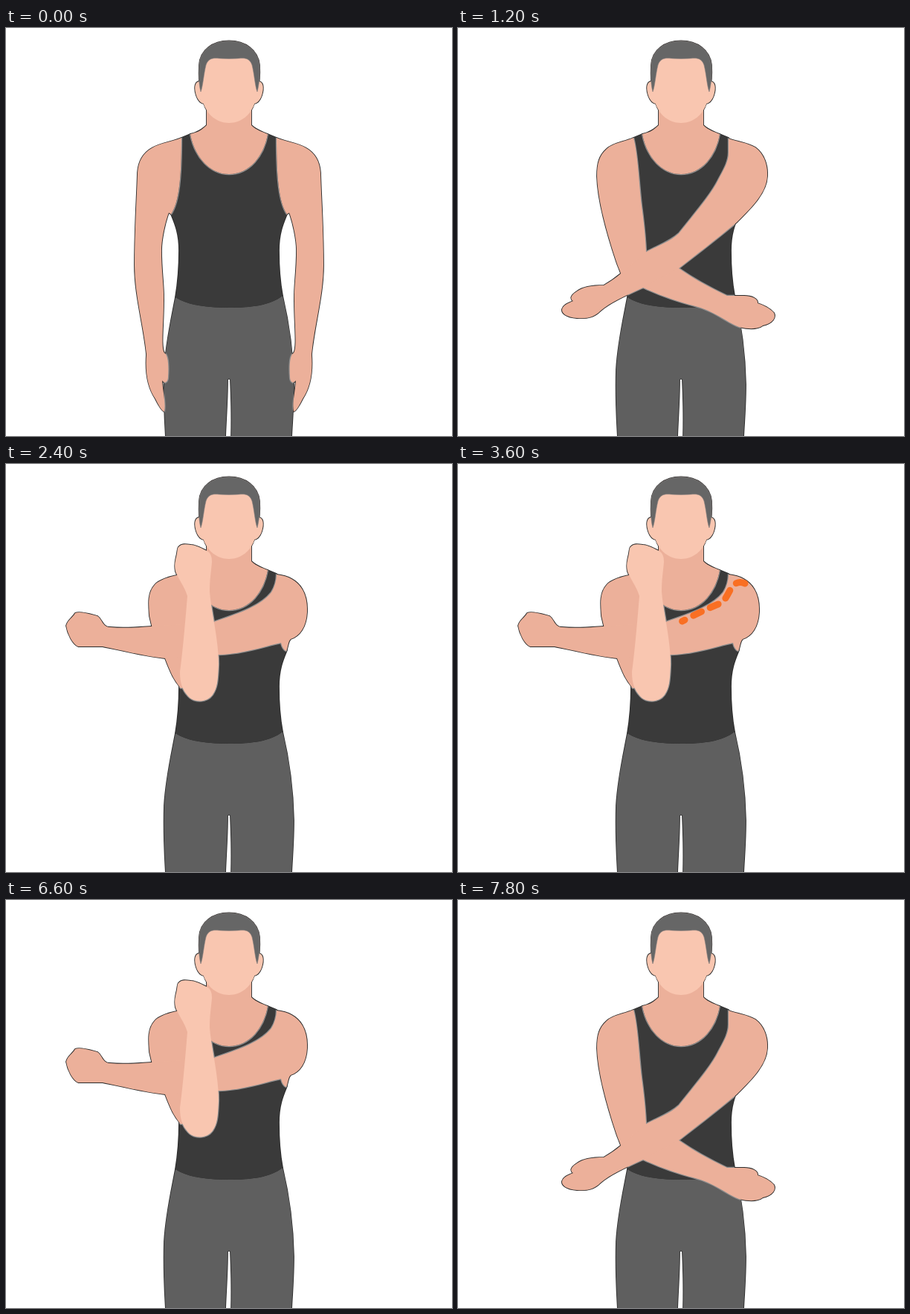
Write an HTML page that moves like this. It is 600x550 px and loops after 8000 ms.

```html
<!DOCTYPE html>
<html lang="en">
<head>
<meta charset="utf-8">
<title>Shoulder stretch</title>
<style>
html, body { margin: 0; width: 100%; height: 100%; overflow: hidden; background: #fff; }
svg { display: block; width: 100%; height: 100%; }
</style>
</head>
<body>
<svg id="stage" viewBox="0 0 600 550"></svg>
<script>
const SKIN = '#ecb09a', LIGHT = '#f9c6b0', HAIR = '#666', SHIRT = '#3a3a3a', PANTS = '#5f5f5f';
const STEP = 600, LOOP = 8000;

const pants = 'M228 363C245 374 270 377 300 377C330 377 355 374 372 361C380 395 386 430 387 480C387 510 385 530 384 552H303C304 520 303 495 302 474Q300 471 298 474C298 500 296 525 295 552H215C213 520 212 490 213 460C215 425 222 395 228 363Z';
const shirt = 'M236 148L248 143C254 175 275 197 300 197C328 197 347 172 352 143L364 148C364 200 367 235 378 251C372 265 367 278 367 300C367 325 369 345 372 361C355 374 330 377 300 377C270 377 245 374 228 363C231 345 233 325 233 300C233 278 228 265 222 251C233 235 236 200 236 148Z';
const neck = 'M270 105V131C263 138 257 141 248 143C254 175 275 197 300 197C328 197 347 172 352 143C345 140 337 138 330 131V105Z';
const ear = 'M262 72C253 71 253 82 256 91C258 97 262 102 267 102L271 112L276 90Z';
const face = 'M262 84C264 100 267 107 272 114C280 124 290 128 300 128C310 128 320 124 328 114C333 107 336 100 338 84L332 38H268Z';
const hair = 'M262 86C260 78 259 70 260 50C261 30 278 17.5 300 17.5C322 17.5 339 30 341 50C342 66 340 78 338 86C335 78 334 62 331 50C328 41 322 40 313 41C305 41.5 295 41.5 287 41C278 40 272 41 269 50C266 62 265 78 262 86Z';

const armDown = 'M236 148C225 153 207 155 196 162C184 169 178 180 177 195C176 230 173 270 173 320C173 360 185 400 189 440C187 466 191 485 201 500C206 510 210 517 213 517C215 505 211 490 210 475C213 480 218 478 218 470C219 455 218 440 213 438C208 430 212 400 212 370C213 350 209 330 209 300C209 285 214 262 219 249L222 251C233 235 236 200 236 148Z';
const armIn = 'M236 148C222 154 206 155 197 163C186 171 182 182 182 198C182 240 186 280 192 325C198 350 212 372 228 392C240 408 250 425 258 440C265 456 280 470 296 477C304 478 306 470 303 462C306 455 305 448 300 442C298 430 288 422 278 412C268 392 255 360 246 330C238 310 238 290 240 260C242 220 240 180 236 148Z';

const mirror = 'matrix(-1 0 0 1 600 0)';
const pair = d => [[d], [d, mirror]];

const down = { arms: pair(armDown) };
const inward = { arms: pair(armIn) };
const crossed = { arms: [
  ['M236 148C222 154 208 155 200 163C190 172 187 182 187 200C188 235 203 285 213 315C216 324 219 329 222 340L249 350C275 362 300 370 316 374C345 381 360 396 378 403C395 407 405 405 410 401C424 398 428 390 425 384C420 378 410 373 403 371C404 365 395 361 385 361H362C345 353 320 340 297 324L253 302C252 280 250 262 247 240C243 205 242 170 236 148Z'],
  ['M364 149C375 153 390 155 400 161C412 170 417 185 416 200C415 223 394 243 375 262C345 287 320 306 297 324L249 350C225 361 205 370 192 381C183 390 175 392 160 391C145 390 139 384 140 379C142 373 148 371 155 368C150 365 152 360 160 355C168 349 180 347 196 347C205 342 213 336 219 331L253 302C270 293 285 288 297 277C320 248 340 225 350 205C358 190 364 180 364 168Z']
] };
const rising = { arms: [
  ['M236 148C222 152 207 155 200 163C190 173 189 188 190 205C194 240 207 270 217 295C224 312 235 322 252 322C290 318 340 304 376 294C390 300 410 300 420 294C432 288 436 280 433 274C426 268 415 266 408 266C404 258 392 258 382 262C374 265 370 268 365 268C330 268 295 268 268 266C258 240 250 205 246 190Z'],
  ['M364 149C376 152 392 155 400 162C410 171 413 186 411 202C408 222 396 236 380 248C340 272 290 292 249 304C220 312 190 316 165 316C150 326 130 326 118 320C106 312 103 302 107 295C112 291 117 290 122 289C121 280 130 276 142 276C152 276 158 284 168 285C190 284 205 278 219 272L253 255C275 245 300 238 318 225C340 208 362 190 364 168Z']
] };
const stretch = {
  arms: [
    ['M240 148C228 150 208 154 200 163C190 174 192 190 193 205L200 235L214 262C222 283 226 291 235 302L262 300L268 170Z'],
    ['M364 149C400 153 406 180 405 200C404 220 395 232 383 236C379 240 380 246 377 252Q372 250 370 241C350 245 320 256 287 257L215 262C190 260 150 250 130 246H97C90 243 83 230 81 218C83 210 90 207 93 201C100 198 115 203 123 205C130 210 130 220 140 220C160 222 180 220 196 219L277 214C300 205 340 195 357 173C362 165 364 155 364 149Z']
  ],
  forearm: 'M232 112C236 107 242 108 249 109C258 110 264 114 270 117C276 120 277 126 277 132C276 145 274 155 274 172C276 200 286 235 286 270C285 294 284 302 278 311C270 322 253 322 245 313C237 304 234 295 234 280C238 250 241 215 244 178C240 165 232 155 228 145C226 135 228 130 229 125C231 118 230 114 232 112Z'
};

// The dashed muscle line grows from the shoulder towards the chest.
const muscle = 'M386 161C376 157 370 162 366 170C360 181 358 186 350 189C335 195 315 205 290 218';
const grow = (whole, last) => ({ ...stretch, dashes: '12 13 '.repeat(whole) + last + ' 999' });
const poses = [down, inward, crossed, rising, stretch, grow(2, 12), grow(4, 4), grow(4, 12)];

const shape = ([d, move = ''], attrs = '') => `<path d="${d}" transform="${move}" ${attrs}/>`;
const each = (list, attrs) => list.map(s => shape(s, attrs)).join('');
const line = (color, width) => `fill="none" stroke="${color}" stroke-width="${width}" stroke-linejoin="round"`;
const fill = color => `fill="${color}"`;

// Dark lines edge the figure; grey ones appear only where skin lies on cloth.
function draw({ arms, forearm, dashes }) {
  const front = forearm ? [[forearm]] : [];
  const ears = pair(ear);
  const skin = [[neck], ...arms];
  return `<clipPath id="cloth">${shape([shirt])}${shape([pants])}</clipPath>` +
    each([[pants], [shirt], [hair], [face], ...ears, ...skin, ...front], line('#2b2b2b', 1.8)) +
    shape([pants], fill(PANTS)) +
    shape([shirt], fill(SHIRT)) +
    `<g clip-path="url(#cloth)">${each([...skin, ...front], line('#8d8d8d', 2.4))}</g>` +
    each(skin, fill(SKIN)) +
    each([...ears, [face]], fill(LIGHT)) +
    shape([hair], fill(HAIR) + ' stroke="#8a8280" stroke-width=".6"') +
    each(front, fill(LIGHT)) +
    (dashes ? shape([muscle], line('#f96f23', 9) + ` stroke-linecap="round" stroke-dasharray="${dashes}"`) : '');
}

const stage = document.getElementById('stage');
let shown = -1;

function tick(now) {
  const step = Math.floor(now % LOOP / STEP);
  const index = Math.min(step, 2 * poses.length - 1 - step);
  if (index !== shown) stage.innerHTML = draw(poses[shown = index]);
  requestAnimationFrame(tick);
}
tick(0);
</script>
</body>
</html>
```
